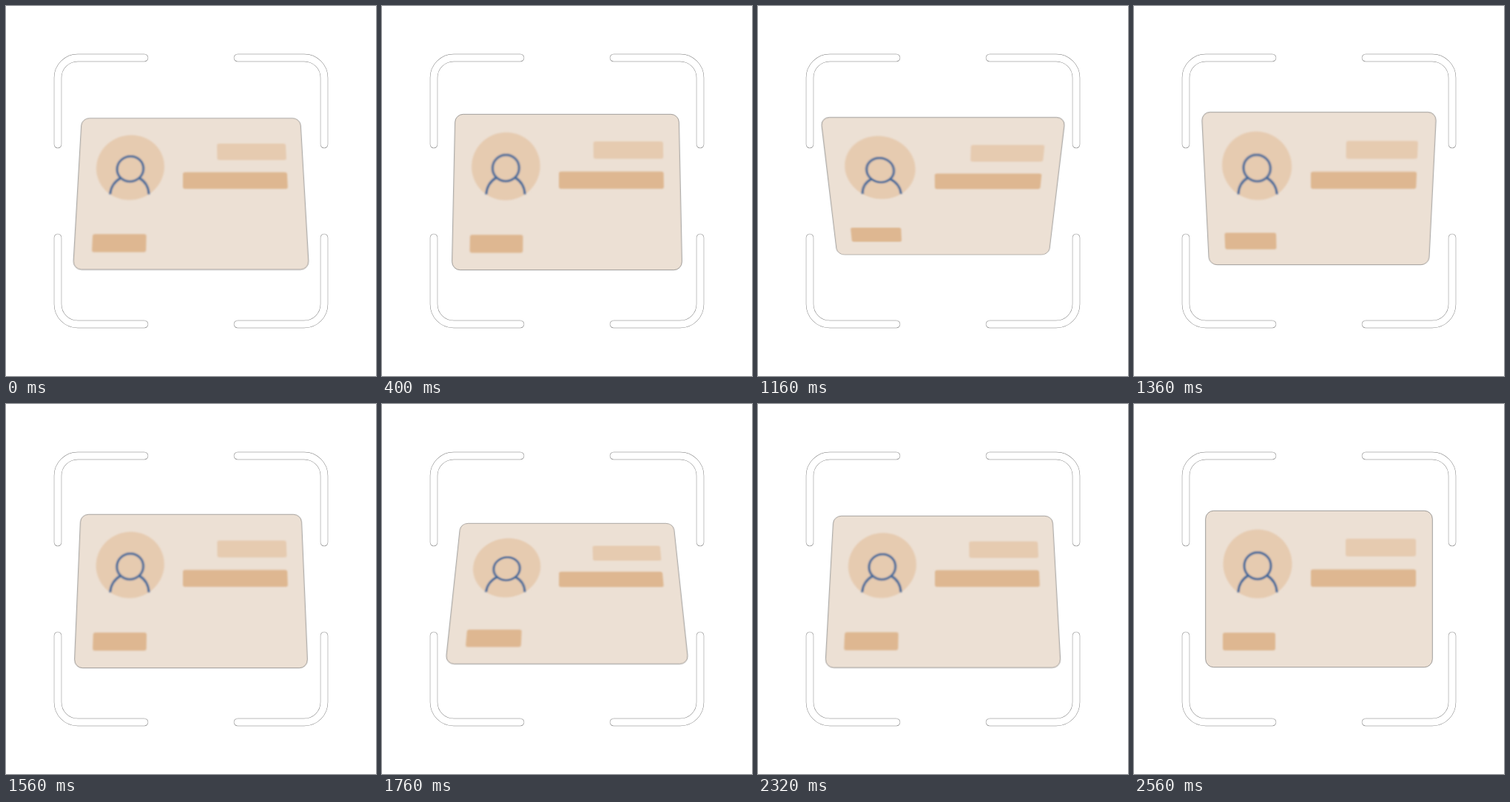
Animation of 500x500 px, one loop 3600 ms. Source, as an HTML page:

```html
<!DOCTYPE html>
<html lang="en">
<head>
<meta charset="utf-8">
<title>Card scan</title>
<style>
  html, body { margin: 0; width: 100%; height: 100%; overflow: hidden; background: #fff; }
  #stage { position: relative; width: 500px; height: 500px; overflow: hidden; perspective: 715px; }
  svg { position: absolute; left: 0; top: 0; width: 500px; height: 500px; fill: none; }
  #card { transform-origin: 250px 250px; }
  .edge { stroke: #777; stroke-width: 10.4; }
  .core { stroke: #fff; stroke-width: 9.5; }
  .light { fill: #e6cbb0; }
  .dark { fill: #deb791; }
</style>
</head>
<body>
<div id="stage">
  <svg viewBox="0 0 500 500">
    <defs>
      <path id="corner" d="M70 187V97A27 27 0 0 1 97 70H187" stroke-linecap="round"/>
      <g id="bracket"><use href="#corner" class="edge"/><use href="#corner" class="core"/></g>
      <g id="pair"><use href="#bracket"/><use href="#bracket" transform="matrix(-1 0 0 1 500 0)"/></g>
    </defs>
    <use href="#pair"/>
    <use href="#pair" transform="matrix(1 0 0 -1 0 500)"/>
  </svg>
  <svg id="card" viewBox="0 0 500 500">
    <filter id="soft"><feGaussianBlur stdDeviation=".8"/></filter>
    <rect x="96.7" y="144.3" width="306.6" height="211.4" rx="11" fill="#ece0d4" stroke="#666" stroke-width=".6"/>
    <g filter="url(#soft)">
      <circle class="light" cx="167" cy="216" r="46.5"/>
      <rect class="light" x="286" y="182" width="95" height="24" rx="3"/>
      <rect class="dark" x="239" y="223.5" width="142" height="23.5" rx="3"/>
      <rect class="dark" x="120" y="309" width="71" height="24" rx="3"/>
      <g stroke="#41699a" stroke-width="3.2">
        <circle cx="167" cy="218.7" r="18"/>
        <path d="M141 254.5A26 26 0 0 1 154 232M193 254.5A26 26 0 0 0 180 232"/>
      </g>
    </g>
  </svg>
</div>
<script>
const LOOP = 3600, STEP = 40;
// Tilt moves: start ms, end ms, from degrees, to degrees
const moves = [
  [200, 880, 15, -30],
  [1110, 1800, -30, 27],
  [2100, 2560, 27, 0],
];
const card = document.getElementById('card');

function tiltAt(time) {
  let tilt = moves[0][2];
  for (const [start, end, from, to] of moves) {
    if (time < start) break;
    const p = Math.min(1, (time - start) / (end - start));
    tilt = from + (to - from) * p * p * (3 - 2 * p);
  }
  return tilt;
}

function draw() {
  const time = Math.floor(performance.now() % LOOP / STEP) * STEP;
  card.style.transform = `rotateX(${tiltAt(time)}deg)`;
  requestAnimationFrame(draw);
}
draw();
</script>
</body>
</html>
```
